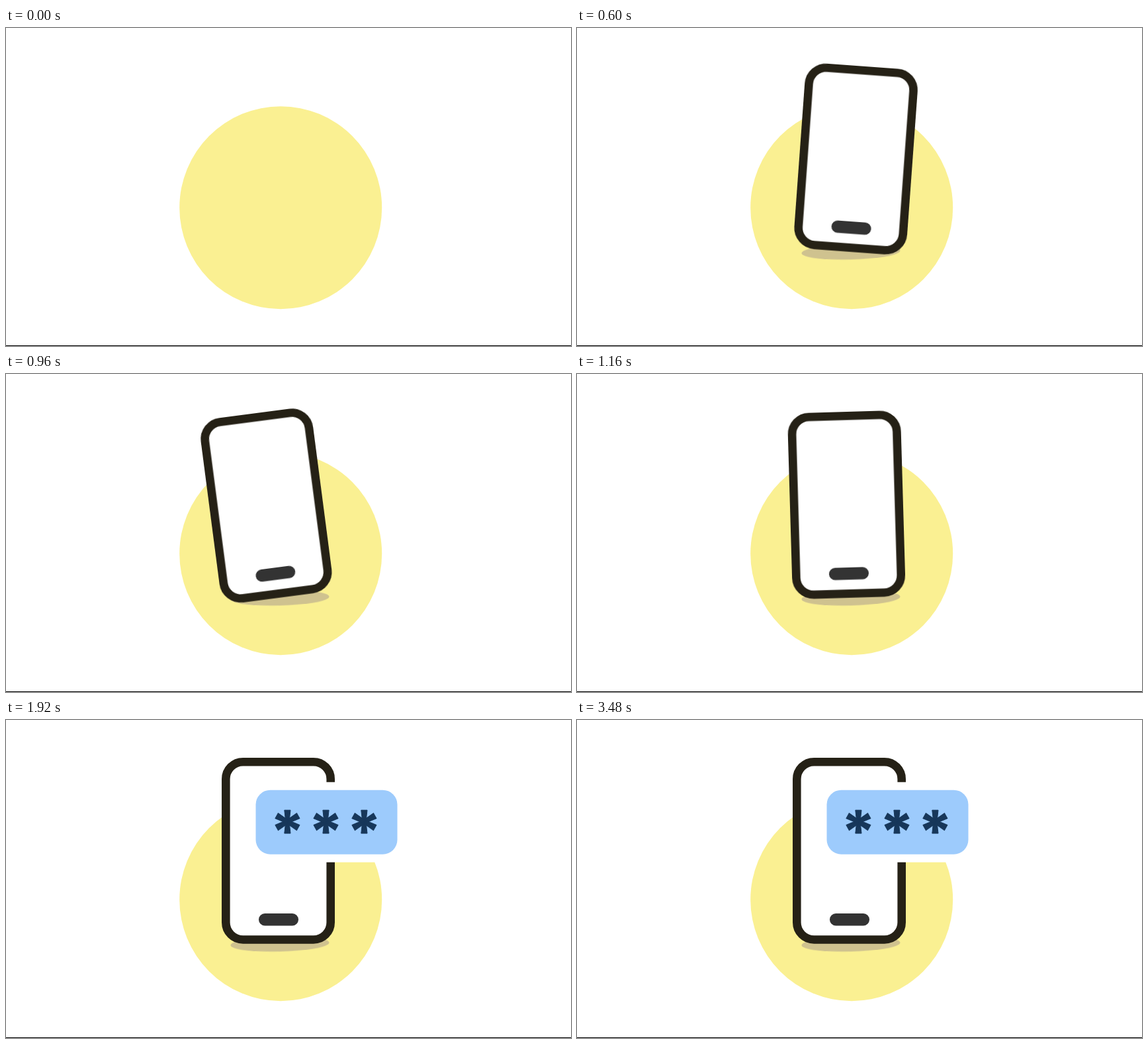
Recreate the animation shown at these times as an HTML page without scripts. Size 854 px wide and 480 px high, loop 3.58 s.

```html
<!DOCTYPE html>
<html lang="en">
<head>
<meta charset="utf-8">
<title>Phone passcode</title>
<style>
  html, body { margin: 0; width: 100%; height: 100%; overflow: hidden; background: #fff; }
  svg { display: block; width: 854px; height: 480px; }

  .pop, .swing, .shadow, .badge { animation: 3580ms infinite both; }
  .pop    { animation-name: pop; transform-origin: 411.5px 197.5px; }
  .swing  { animation-name: swing; transform-origin: 412px 337px;
            animation-timing-function: cubic-bezier(.37, 0, .63, 1); }
  .shadow { animation-name: shadow; }
  .badge  { animation-name: badge; transform-origin: 484.5px 154px; }

  @keyframes pop {
    0%, 1.1% { transform: scale(0); animation-timing-function: ease-out; }
    7.82%    { transform: scale(1.05); animation-timing-function: ease-in-out; }
    10.6%, 100% { transform: none; }
  }
  @keyframes swing {
    0%, 13.4% { transform: rotate(0deg); }
    20.11%    { transform: rotate(8.2deg); }
    27.93%    { transform: rotate(-8.2deg); }
    34.36%, 100% { transform: rotate(0deg); }
  }
  @keyframes shadow {
    0%, 12.2% { opacity: 0; }
    15.6%, 100% { opacity: 1; }
  }
  @keyframes badge {
    0%, 34.64% { transform: scale(0); animation-timing-function: ease-out; }
    40.22%     { transform: scale(1.3); animation-timing-function: ease-in-out; }
    45.8%, 100% { transform: none; }
  }
</style>
</head>
<body>
<svg viewBox="0 0 854 480">
  <defs>
    <path id="arm" d="M-2.6 0L-4.6-17.5H4.6L2.6 0Z"/>
    <g id="star" fill="#17375a" stroke="#17375a" stroke-linejoin="round">
      <use href="#arm"/>
      <use href="#arm" transform="rotate(61) scale(1 1.06)"/>
      <use href="#arm" transform="rotate(119) scale(1 1.06)"/>
      <use href="#arm" transform="rotate(180)"/>
      <use href="#arm" transform="rotate(241) scale(1 1.06)"/>
      <use href="#arm" transform="rotate(299) scale(1 1.06)"/>
    </g>
  </defs>

  <rect width="854" height="480" fill="#fff"/>
  <circle cx="415.2" cy="271.2" r="153" fill="#faf092"/>
  <g class="shadow">
    <ellipse cx="414" cy="338" rx="74.5" ry="11.5" fill="#cfc28f" transform="rotate(-1.5 414 338)"/>
  </g>

  <g class="pop">
    <g class="swing">
      <rect x="332.3" y="63.2" width="158.4" height="268.3" rx="26" fill="#fff" stroke="#252116" stroke-width="12.6"/>
      <rect x="382" y="292" width="60" height="18.4" rx="9.2" fill="#333"/>
    </g>
  </g>

  <g class="badge">
    <rect x="365.5" y="93.7" width="238" height="121" rx="34" fill="#fff"/>
    <rect x="377.5" y="105.7" width="214" height="97" rx="22" fill="#9dcbfc"/>
    <use href="#star" x="425.4" y="153.6"/>
    <use href="#star" x="483.5" y="153.6"/>
    <use href="#star" x="541.4" y="153.6"/>
  </g>

  <rect y="479" width="854" height="1" fill="#000"/>
</svg>
</body>
</html>
```
